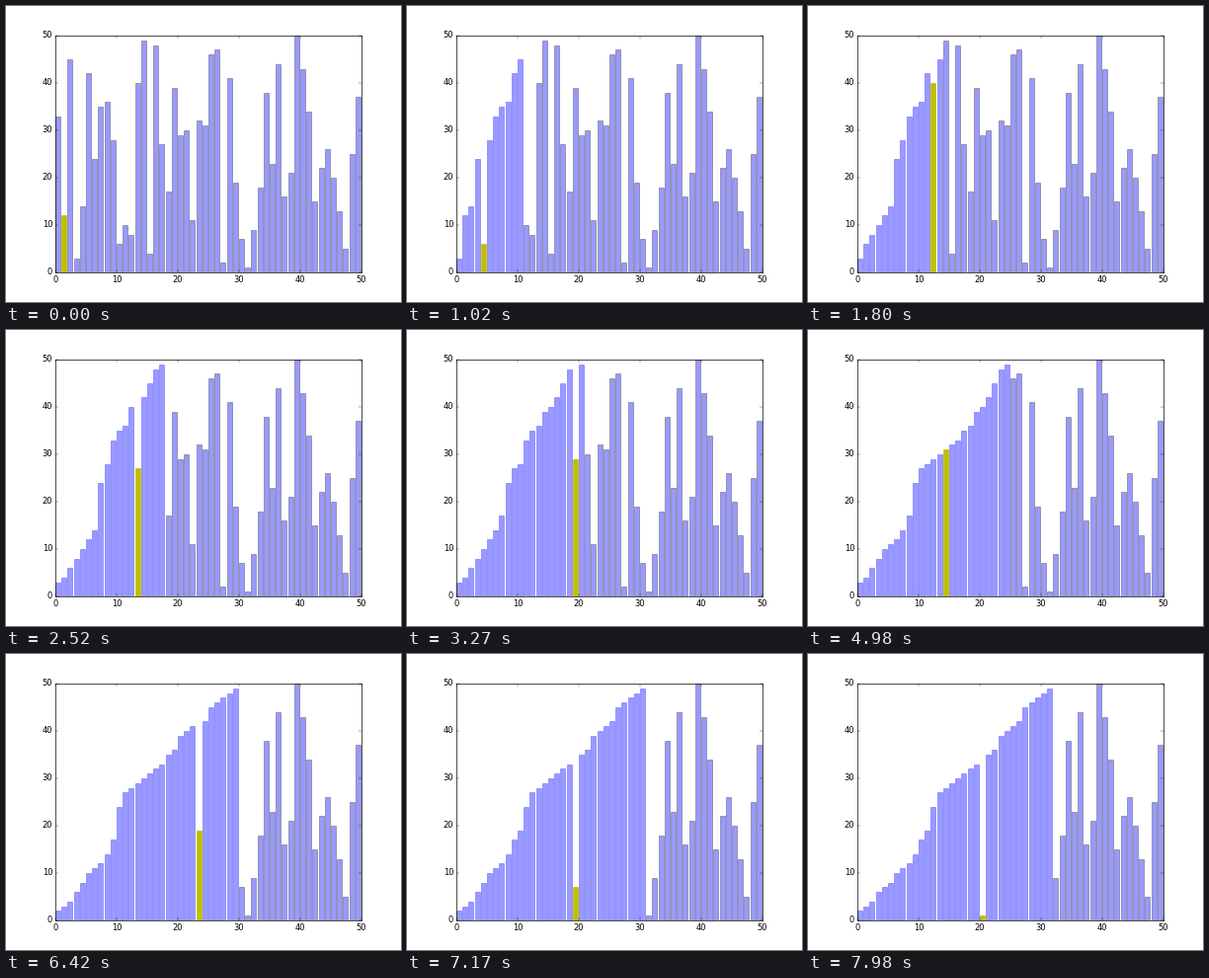
A matplotlib script for the animation above (8 s loop, 400 by 300 pixels).

```python
import itertools

import matplotlib.pyplot as plt
from matplotlib.animation import FuncAnimation

LOOP_MS = 8000
FRAMES = 267
BLUE, YELLOW = (0, 0, 1), (0.75, 0.75, 0)
ALPHA = 0.4

# The shuffled input; every later state follows from sorting it.
START = [33, 12, 45, 3, 14, 42, 24, 35, 36, 28,
         6, 10, 8, 40, 49, 4, 48, 27, 17, 39,
         29, 30, 11, 32, 31, 46, 47, 2, 41, 19,
         7, 1, 9, 18, 38, 23, 44, 16, 21, 50,
         43, 34, 15, 22, 26, 20, 13, 5, 25, 37]
SIZE = len(START)

plt.rcParams.update({
    "font.family": "DejaVu Sans",
    "font.size": 12,
    "text.hinting": "auto",
    "text.hinting_factor": 8,
    "axes.linewidth": 1.0,
    "ytick.alignment": "center",
    "savefig.dpi": 50,
})


def insertion_sort(data):
    """Yield (values, key position, visited positions) for every step."""
    a = list(data)
    visited = set()
    for i in range(1, len(a)):
        j = i
        visited.add(j)
        yield tuple(a), j, frozenset(visited)
        while j > 0 and a[j - 1] > a[j]:
            a[j - 1], a[j] = a[j], a[j - 1]
            j -= 1
            visited.add(j)
            yield tuple(a), j, frozenset(visited)


steps = list(itertools.islice(insertion_sort(START), FRAMES))

fig = plt.figure(figsize=(8, 6), dpi=50, facecolor="white")
ax = fig.add_axes([0.125, 0.1, 0.775, 0.8])
bars = ax.bar(range(SIZE), START, width=0.8, align="edge", linewidth=1.0)
ticks = range(0, SIZE + 1, 10)
ax.set(xlim=(0, SIZE), ylim=(0, SIZE), xticks=ticks, yticks=ticks)
ax.tick_params(direction="in", length=4, width=0.5, pad=4,
               top=True, right=True)


def draw(frame):
    values, key, visited = steps[frame]
    for k, (bar, value) in enumerate(zip(bars, values)):
        if k == key:
            face = edge = YELLOW
        else:
            face = (*BLUE, ALPHA)
            edge = face if k in visited else (0, 0, 0, ALPHA)
        bar.set(height=value, facecolor=face, edgecolor=edge)
    return list(bars)


anim = FuncAnimation(fig, draw, frames=FRAMES, interval=LOOP_MS / FRAMES,
                     init_func=lambda: draw(0), repeat=True, blit=False)
plt.show()
```
